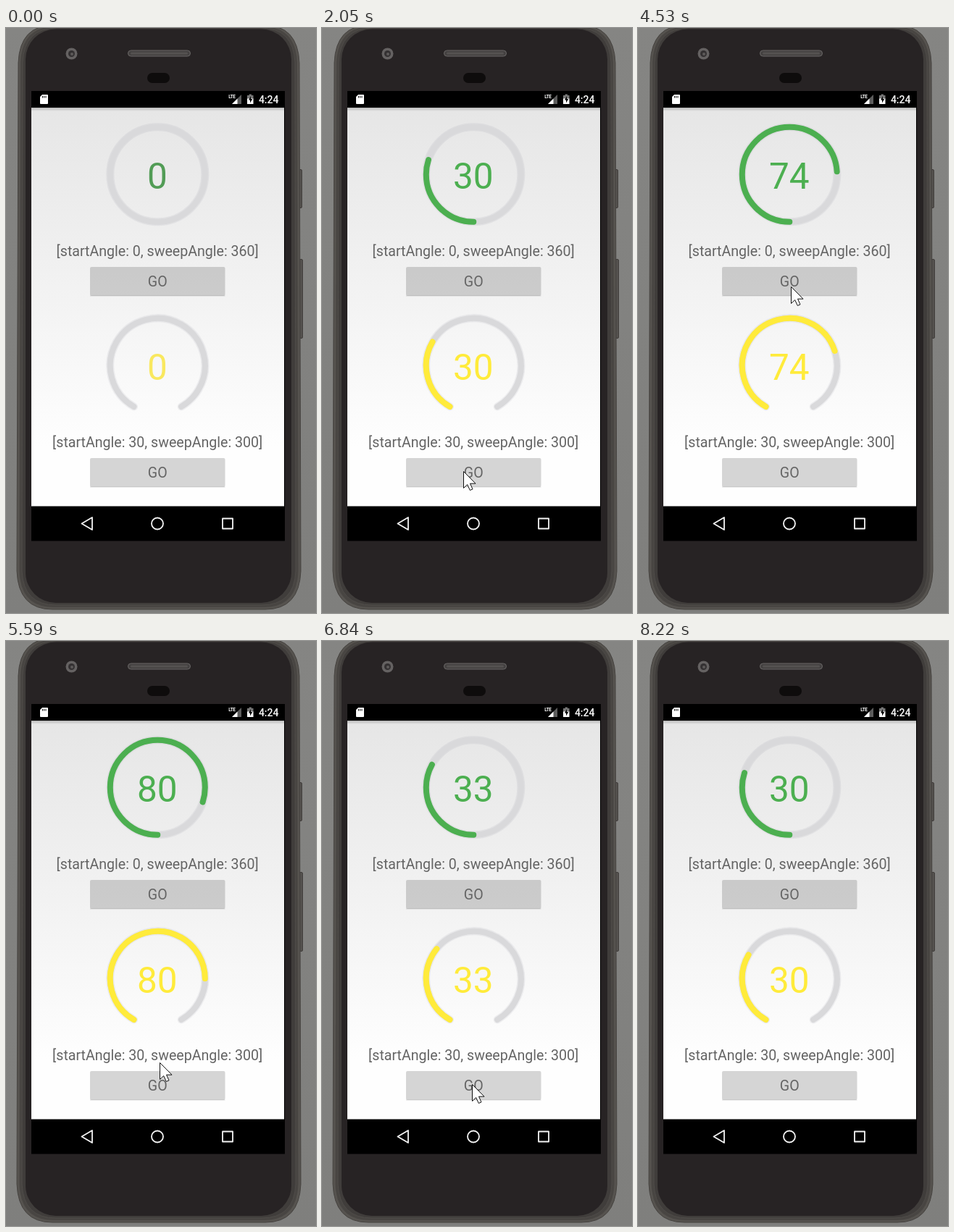
Write an HTML page that moves like this. It is 428 by 808 pixels and loops after 8620 ms.

```html
<!DOCTYPE html>
<html lang="en">
<head>
<meta charset="utf-8">
<title>Progress rings</title>
<style>
  html, body { margin: 0; width: 100%; height: 100%; overflow: hidden; background: #82827f; }
  svg { display: block; width: 428px; height: 808px; font-family: Roboto, sans-serif; }
  .label, .go { font-size: 19.6px; fill: #646464; text-anchor: middle; }
  .num { font-size: 49.5px; text-anchor: middle; }
  .ring { fill: none; stroke-width: 8; stroke-linecap: round; }
  .halo { stroke: #77778a; stroke-opacity: .1; stroke-width: 11; }
  .track { stroke: #d9d9db; }
  .nav { fill: none; stroke: #f4f4f4; stroke-width: 1.8; stroke-linejoin: round; }
</style>
</head>
<body>
<svg viewBox="0 0 428 808">
  <defs>
    <linearGradient id="wall" x2="0" y2="1">
      <stop stop-color="#858583"/><stop offset="1" stop-color="#7f7f7d"/>
    </linearGradient>
    <linearGradient id="page" x2="0" y2="1">
      <stop stop-color="#e6e6e6"/><stop offset=".45" stop-color="#f2f2f2"/><stop offset=".85" stop-color="#fefefe"/>
    </linearGradient>
    <linearGradient id="drop" x2="0" y2="1">
      <stop stop-opacity=".2"/><stop offset="1" stop-opacity="0"/>
    </linearGradient>
  </defs>

  <rect width="428" height="808" fill="url(#wall)"/>

  <g id="phone">
    <rect x="403" y="195.500" width="5.500" height="53" rx="1.500" fill="#55524f" stroke="#403d3b"/>
    <rect x="403" y="319.500" width="6.500" height="109" rx="1.500" fill="#55524f" stroke="#403d3b"/>
    <path d="M17 48Q19-4 66-4H356Q403-4 405 48L407 750Q405 803 358 803H64Q17 803 15 750z" fill="#56534f" stroke="#45423f"/>
    <path d="M20 48Q22-2 68-2H354Q400-2 402 48L403.500 750Q402 800 356 800H66Q20 800 18.500 750z" fill="#484542"/>
    <path d="M23 48Q25 0 70 0H352Q397 0 399 48L400 750Q398 797 353 797H69Q24 797 22 750z" fill="#403d3b" stroke="#4f4c49"/>
    <rect x="27" y="1.500" width="367" height="792.500" rx="42" fill="#272324"/>
    <circle cx="90.500" cy="35.500" r="8" fill="#656262"/>
    <circle cx="90.500" cy="35.500" r="4.500" fill="#343132"/>
    <circle cx="91" cy="36" r="2" fill="#5d5a5a"/>
    <rect x="168.500" y="31" width="86" height="8" rx="4" fill="#444141" stroke="#6a6766"/>
    <rect x="172" y="33.500" width="79" height="3" rx="1.500" fill="#555251"/>
    <rect x="195" y="62" width="31" height="14" rx="7" fill="#0e0c0c"/>
  </g>

  <rect x="35" y="87" width="350" height="621.500"/>
  <rect x="35" y="110" width="349" height="550.500" fill="url(#page)"/>
  <rect x="35" y="110" width="349" height="5" fill="url(#drop)"/>

  <g id="status" fill="#fff">
    <path d="M50 92h7a1 1 0 0 1 1 1v11a1 1 0 0 1-1 1h-9a1 1 0 0 1-1-1V95z"/>
    <path d="M50.500 94v2.500M52.700 94v2.500M55 94v2.500" stroke="#000"/>
    <path d="M325 92v13h-13z" fill="#5c5c5c"/>
    <path d="M319.500 97.500v7.500H312z"/>
    <text x="307.300" y="97" font-size="6.300" font-weight="700" letter-spacing="-.3">LTE</text>
    <path d="M335.500 91.500h3.500v1.500h2.500v5h-8.500v-5h2.500z" fill="#777"/>
    <path d="M333 97.500h8.500v7.500H333z"/>
    <path d="M338 94l-3 5.500h2v4l3.200-5.500h-2.200z" fill="#000"/>
    <text x="376.500" y="103.500" font-size="14" font-weight="500" text-anchor="end">4:24</text>
  </g>

  <g class="nav">
    <path d="M104.500 684.500l14.500-8.500v17z"/>
    <circle cx="209" cy="684.500" r="8"/>
    <rect x="299" y="677.500" width="14" height="14"/>
  </g>

  <g id="gauges"></g>

  <path id="cursor" d="M.5.500V23.500L5.700 18.600 9.300 26.500 13 24.900 9.500 17.200H17z" fill="#fff" stroke="#111" stroke-linejoin="round"/>
</svg>

<script>
const LOOP = 8620;
const $ = id => document.getElementById(id);

function makeGauge(top, start, sweep, color, idle) {
  const ring = cls =>
    `<circle class="ring ${cls}" cx="209.300" cy="202.300" r="65.500" pathLength="360"
      transform="rotate(${90 + start} 209.300 202.300)"
      ${sweep < 360 ? `stroke-dasharray="${sweep} 720"` : ''}/>`;
  const g = document.createElementNS('http://www.w3.org/2000/svg', 'g');
  g.setAttribute('transform', `translate(0 ${top})`);
  g.innerHTML = ring('halo') + ring('track') + ring('bar') + `
    <text class="num" x="208.800" y="221.700"></text>
    <text class="label" x="209.200" y="315">[startAngle: ${start}, sweepAngle: ${sweep}]</text>
    <rect x="116" y="369.500" width="186.500" height="1" fill-opacity=".13"/>
    <rect class="key" x="116" y="330" width="186.500" height="40" rx="2" fill-opacity=".16"/>
    <text class="go" x="209.200" y="357">GO</text>`;
  $('gauges').append(g);

  const bar = g.querySelector('.bar');
  const num = g.querySelector('.num');
  const key = g.querySelector('.key');
  bar.style.stroke = color;
  return (value, press) => {
    num.textContent = value;
    num.style.fill = value ? color : idle;
    bar.style.visibility = value ? 'visible' : 'hidden';
    bar.setAttribute('stroke-dasharray', `${value * sweep / 100} 720`);
    key.setAttribute('fill-opacity', .16 + .085 * press);
  };
}

const green = makeGauge(0, 0, 360, '#4caf50', '#529c56');
const yellow = makeGauge(264, 30, 300, '#ffeb3b', '#f9e85f');

// Index of the last of n evenly spaced ticks between a and b, -1 before a.
function tick(t, a, b, n) {
  if (t < a) return -1;
  return Math.min(n - 1, Math.floor((t - a + 8) / ((b - a) / (n - 1))));
}

// Decelerating whole-number count.
function ease(from, to, p) {
  p = Math.min(1, Math.max(0, p));
  return from + Math.trunc((to - from) * (1 - (1 - p) ** 2));
}

function valueAt(t) {
  if (t >= 6140) return ease(80, 30, (tick(t, 6140, 7070, 13) + 1) / 13);
  if (t >= 4820) return 80;
  if (t >= 3840) return ease(30, 80, (tick(t, 3840, 4820, 14) - .4) / 13);
  return ease(0, 30, (tick(t, 1510, 2050, 8) + 1) / 8);
}

function pressAt(t, down, hold, up) {
  return t < down || t >= up ? 0 : t < hold ? 1 : .5;
}

// Pointer moves: first tick, last tick, position at each tick.
const moves = [
  [430, 1050, [[236, 525], [234, 540], [230, 557], [224, 576], [216, 594], [208, 608], [201, 616], [197, 614], [195, 612]]],
  [2980, 3210, [[197, 588], [203, 515], [207, 432], [205, 384]]],
  [3360, 3360, [[211, 357]]],
  [5280, 5740, [[213, 369], [217, 410], [219, 468], [217, 530], [212, 582], [208, 606], [207, 612]]],
  [7300, 7300, [[206, 609]]],
  [7450, 8220, [[212, 609], [222, 609], [232, 609], [248, 602], [268, 598], [290, 607], [311, 634], [330, 676], [345, 726], [356, 780], null]]
];

function cursorAt(t) {
  const move = moves.findLast(m => t >= m[0]);
  if (!move) return null;
  const [a, b, spots] = move;
  return spots.length > 1 ? spots[tick(t, a, b, spots.length)] : spots[0];
}

function draw(t) {
  const value = valueAt(t);
  green(value, pressAt(t, 3840, 3910, 3990));
  yellow(value, pressAt(t, 5990, 6140, 6215));
  const spot = cursorAt(t);
  const cursor = $('cursor');
  cursor.style.visibility = spot ? 'visible' : 'hidden';
  if (spot) cursor.setAttribute('transform', `translate(${spot})`);
}

const begin = performance.now();
function loop() {
  draw((performance.now() - begin) % LOOP);
  requestAnimationFrame(loop);
}
loop();
</script>
</body>
</html>
```
